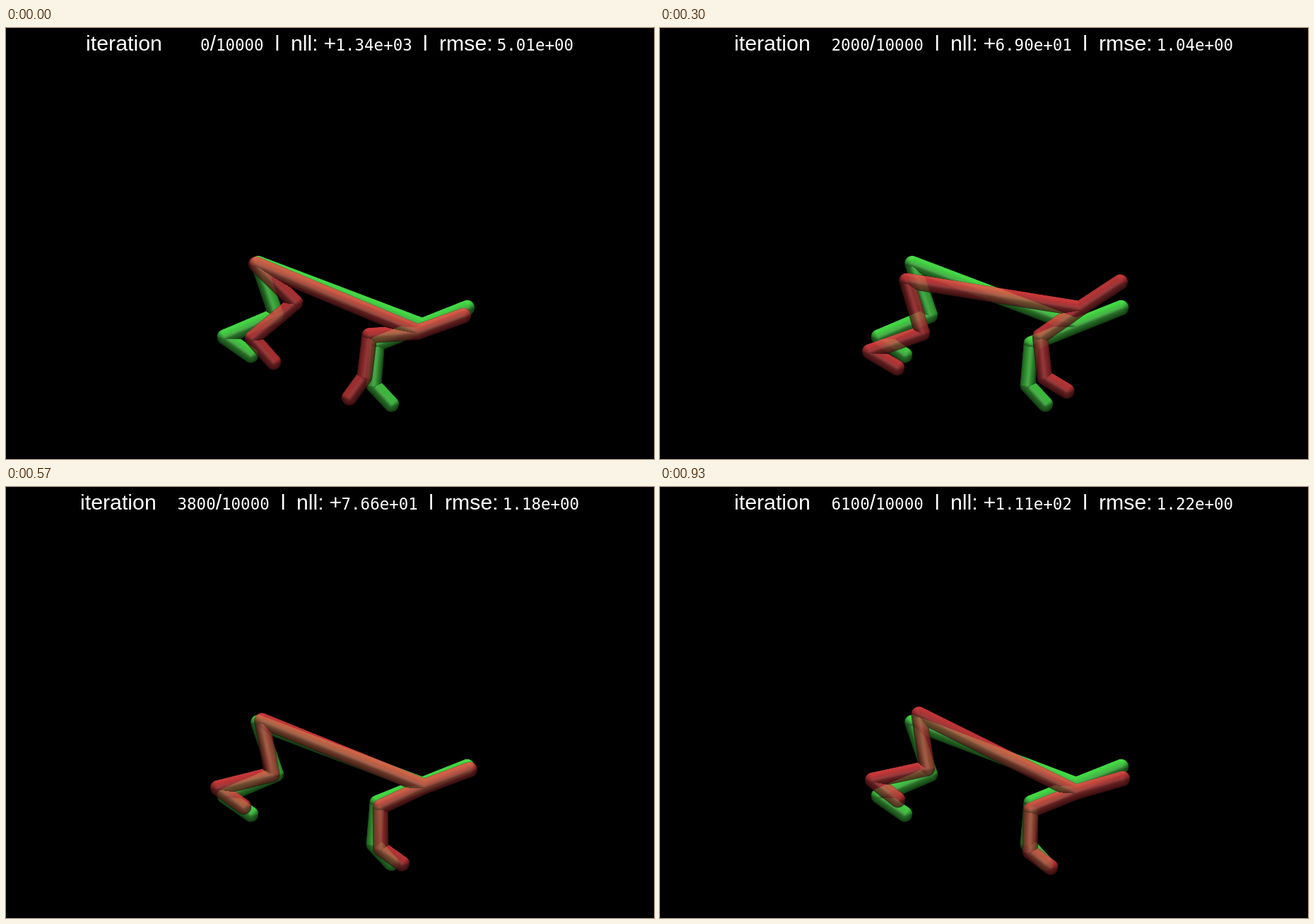
These frames come from a looping animation (917x611 px, 1960 ms). An HTML page with a canvas:

```html
<!DOCTYPE html>
<html lang="en">
<head>
<meta charset="utf-8">
<title>Pose fitting</title>
<style>
  html, body { margin: 0; width: 100%; height: 100%; overflow: hidden; background: #000; }
  canvas { display: block; }
</style>
</head>
<body>
<canvas id="stage" width="917" height="611"></canvas>
<script>
const ctx = document.getElementById('stage').getContext('2d');
const LOOP = 1960, STEP = 30, LAST = 31, SETTLED = 7;
const SANS = '"Liberation Sans", Arial, sans-serif';
const MONO = '"DejaVu Sans Mono", monospace';

// Limb lengths: thigh, shin, foot
const TORSO = 248, HEAD = 68.5, HEAD_BEND = -42.5, RADIUS = 11.1;
const REAR = [77.5, 79, 45], FRONT = [68.5, 59, 36.5];

// Hip position, then absolute angles in degrees
const truth  = { hip: [357, 334], torso: 20.8, rear: [71, 157, 35], front: [157.9, 94.8, 47.2] };
const guess  = { hip: [354, 335], torso: 22.8, rear: [44.5, 140, 48.5], front: [175.8, 96.9, 125.9] };
const level  = { hip: [346, 365], torso: 6, rear: [72, 159.3, 29.4], front: [142.5, 82.3, 30] };
const leaned = { hip: [368, 319], torso: 28, rear: [82, 168.4, 38.7], front: [159.4, 92, 37.5] };

const clamp = (v, a, b) => Math.min(b, Math.max(a, v));
const mix = (a, b, u) => Array.isArray(a) ? a.map((v, i) => mix(v, b[i], u)) : a + (b - a) * u;

function blend(p, q, u) {
  const out = {};
  for (const key in p) out[key] = mix(p[key], q[key], u);
  return out;
}

// The first guess jumps to a level pose, then leans forward and swings back a little
function fitted(k) {
  if (k < SETTLED) return blend(guess, level, 1 - (1 - k / SETTLED) ** 2);
  const a = Math.PI * (k - SETTLED) / 20;
  return blend(level, leaned, (Math.sin(a / 2) + (1 - Math.cos(a)) / 2) / 2);
}

function reach([x, y], length, degrees) {
  const a = degrees * Math.PI / 180;
  return [x + length * Math.cos(a), y + length * Math.sin(a)];
}

function skeleton(pose) {
  const bones = [];
  const bone = (from, length, angle) => {
    const to = reach(from, length, angle);
    bones.push([from, to]);
    return to;
  };
  const leg = (from, lengths, angles) =>
    lengths.reduce((joint, length, i) => bone(joint, length, angles[i]), from);
  const shoulder = bone(pose.hip, TORSO, pose.torso);
  bone(shoulder, HEAD, pose.torso + HEAD_BEND);
  leg(pose.hip, REAR, pose.rear);
  leg(shoulder, FRONT, pose.front);
  return bones;
}

// Region of the stage that holds both bodies
const X0 = 270, Y0 = 295, W = 410, H = 270;

function capsule(px, depth, [a, b], color) {
  const r = RADIUS, dx = b[0] - a[0], dy = b[1] - a[1], len2 = dx * dx + dy * dy;
  const left = Math.max(X0, Math.floor(Math.min(a[0], b[0]) - r - 1));
  const right = Math.min(X0 + W - 1, Math.ceil(Math.max(a[0], b[0]) + r + 1));
  const top = Math.max(Y0, Math.floor(Math.min(a[1], b[1]) - r - 1));
  const bottom = Math.min(Y0 + H - 1, Math.ceil(Math.max(a[1], b[1]) + r + 1));
  for (let y = top; y <= bottom; y++) {
    for (let x = left; x <= right; x++) {
      const u = clamp(((x + .5 - a[0]) * dx + (y + .5 - a[1]) * dy) / len2, 0, 1);
      const cy = a[1] + u * dy;
      const ex = x + .5 - a[0] - u * dx, ey = y + .5 - cy;
      const d = Math.hypot(ex, ey), cover = clamp(r - d + .5, 0, 1);
      if (!cover) continue;
      const nz = Math.sqrt(Math.max(0, 1 - d * d / (r * r)));
      const z = nz * r - .2 * cy;
      const i = (y - Y0) * W + x - X0;
      if (z < depth[i]) continue;
      if (cover > .5) depth[i] = z;
      const light = .1 + .31 * nz + .67 * Math.max(0, .94 * -ey / r + .22 * nz);
      const shine = 24 * nz ** 20;
      for (let c = 0; c < 3; c++) {
        const q = i * 4 + c;
        px[q] = mix(px[q], Math.min(255, color[c] * light + shine), cover);
      }
      px[i * 4 + 3] = Math.max(px[i * 4 + 3], 255 * cover);
    }
  }
}

// A shaded body on a transparent layer of its own
function layer(pose, color) {
  const el = document.createElement('canvas');
  el.width = W;
  el.height = H;
  const g = el.getContext('2d'), img = g.createImageData(W, H);
  const depth = new Float32Array(W * H).fill(-1e9);
  const height = ([a, b]) => a[1] + b[1];
  skeleton(pose)
    .sort((p, q) => height(q) - height(p))
    .forEach(bone => capsule(img.data, depth, bone, color));
  g.putImageData(img, 0, 0);
  return el;
}

const green = layer(truth, [82, 255, 82]);

// Readings at a few steps; they run exponentially in between
const readings = [
  [0, 1340, 5.01], [7, 70.7, .974], [13, 67.4, 1.1], [19, 76.6, 1.18],
  [22, 91.1, 1.26], [27, 124, 1.26], [31, 111, 1.22]
];

function reading(k, column) {
  const next = Math.max(1, readings.findIndex(row => row[0] >= k));
  const p = readings[next - 1], q = readings[next];
  return p[column] * (q[column] / p[column]) ** ((k - p[0]) / (q[0] - p[0]));
}

function sci(v) {
  const [m, e] = v.toExponential(2).split('e');
  return `${m}e${e[0] === '-' ? '\u2212' : '+'}${e.slice(1).padStart(2, '0')}`;
}

function write(text, x, font, align = 'left') {
  const mono = font === MONO;
  ctx.font = `${mono ? 22.5 : 30.3}px ${font}`;
  ctx.textAlign = align;
  ctx.fillText(text, x, mono ? 31.5 : 32);
}

function header(k) {
  const count = String(Math.min(6100, k * 200));
  const shift = 2.7 * (4 - count.length);
  ctx.fillStyle = '#fff';
  write('iteration', 105 + shift, SANS);
  ctx.save();
  ctx.translate(-shift, 0);
  write(count, 296.7, MONO, 'right');
  write('/', 301, SANS, 'center');
  write('10000', 305, MONO);
  write('l', 392, SANS, 'center');
  write('nll:', 411, SANS);
  write('+', 457.5, SANS);
  write(sci(reading(k, 1)), 474.5, MONO);
  write('l', 601.5, SANS, 'center');
  write('rmse:', 621, SANS);
  write(sci(reading(k, 2)), 702.8, MONO);
  ctx.restore();
}

function draw(k) {
  ctx.fillStyle = '#000';
  ctx.fillRect(0, 0, 917, 611);
  ctx.drawImage(green, X0, Y0);
  ctx.globalAlpha = .78;
  ctx.drawImage(layer(fitted(k), [292, 84, 86]), X0, Y0);
  ctx.globalAlpha = 1;
  header(k);
}

let start = null, shown = 0;
function tick(now) {
  if (start === null) start = now;
  const k = Math.min(LAST, Math.floor(((now - start) % LOOP) / STEP));
  if (k !== shown) draw(shown = k);
  requestAnimationFrame(tick);
}
draw(shown);
requestAnimationFrame(tick);
</script>
</body>
</html>
```
